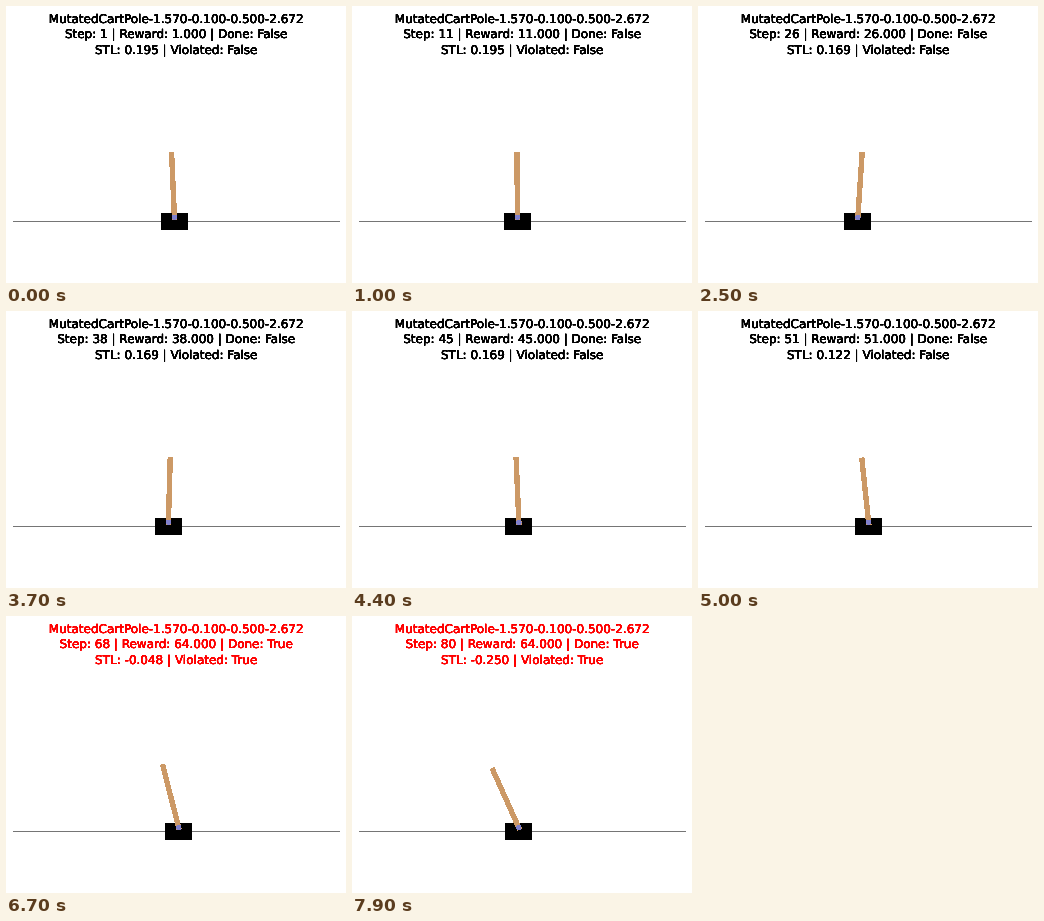
Recreate the animation shown at these times as an HTML page. Size 340 by 277 pixels, loop 8 s.

```html
<!DOCTYPE html>
<html lang="en">
<head>
<meta charset="utf-8">
<title>Cart pole</title>
<style>
  html, body { margin: 0; width: 100%; height: 100%; overflow: hidden; background: #fff; }
  svg { display: block; }
  text {
    font: 12px "DejaVu Sans", sans-serif;
    text-anchor: middle;
    text-rendering: geometricPrecision;
    white-space: pre;
  }
  #cart { shape-rendering: crispEdges; }
</style>
</head>
<body>
<svg width="340" height="277" viewBox="0 0 340 277">
  <g id="caption"></g>
  <rect x="7" y="215" width="327" height="1" fill="#757575"/>
  <g id="cart">
    <rect x="-13.6" y="207" width="27.2" height="17"/>
    <g transform="translate(0 211.4)">
      <rect id="pole" x="-2.7" y="-65.2" width="5.4" height="67.9" fill="#cc9966"/>
      <circle r="2.7" fill="#8080cc"/>
    </g>
  </g>
</svg>
<script>
const STEP_MS = 100, STEPS = 80, COPIES = 8;
const MARGIN = 0.247;          // lean at which the constraint is violated
const LEAN_TO_DEG = 0.849 * 180 / Math.PI;

// The cart is pushed left, then right from FIRST_TURN, then left again from LAST_TURN.
const FIRST_TURN = 11.98, LAST_TURN = 43.17, CART_LAG = 0.4;
const PIVOT = 50;              // step at which position and speed are given
const PUSH = 0.0435;           // cart acceleration, px per step squared
const RATE = 0.0745;           // growth rate of the falling pole per step
const BALANCE = 0.1987;        // lean at which gravity cancels the push

const before = (turn, step) => Math.max(0, turn - step);

// Linearised inverted pendulum under the three pushes
function leanAt(step) {
  const t = RATE * (step - PIVOT);
  const swing = turn => 2 * BALANCE * (Math.cosh(RATE * before(turn, step)) - 1);
  return 0.0737 * Math.cosh(t) - 0.1454 * Math.sinh(t) - BALANCE
    - swing(LAST_TURN) + swing(FIRST_TURN);
}

// Constant acceleration under each push, plus a small recoil from the pole
function cartAt(step) {
  const t = step - PIVOT;
  const shift = turn => PUSH * before(turn + CART_LAG, step) ** 2;
  return 170.4 + 0.472 * t - PUSH / 2 * t * t
    + shift(LAST_TURN) - shift(FIRST_TURN) - 1.73 * leanAt(step);
}

let worst = 0, reward = 0, failed = false;
const states = Array.from({ length: STEPS }, (_, step) => {
  const lean = leanAt(step);
  worst = Math.max(worst, Math.abs(lean));
  if (!failed) reward++;
  failed = worst > MARGIN;
  return { x: cartAt(step), lean, stl: MARGIN - worst, reward, failed };
});

const caption = document.getElementById("caption");
const cart = document.getElementById("cart");
const pole = document.getElementById("pole");

// Overprinting each line hardens the glyph edges.
function addLine(x, y) {
  return Array.from({ length: COPIES }, () => {
    const el = document.createElementNS("http://www.w3.org/2000/svg", "text");
    el.setAttribute("x", x);
    el.setAttribute("y", y);
    return caption.appendChild(el);
  });
}
const [title, progress, verdict] = [17, 32, 48].map(y => addLine(170.2, y));
const write = (line, text) => line.forEach(el => { el.textContent = text; });
const flag = value => value ? "True" : "False";

write(title, "MutatedCartPole-1.570-0.100-0.500-2.672");

function draw(step) {
  const { x, lean, stl, reward, failed } = states[step];
  write(progress, `Step: ${step + 1} | Reward: ${reward.toFixed(3)} | Done: ${flag(failed)}`);
  write(verdict, `STL: ${stl.toFixed(3)} | Violated: ${flag(failed)}`);
  caption.setAttribute("fill", failed ? "#f00" : "#000");
  cart.setAttribute("transform", `translate(${x.toFixed(2)} 0)`);
  pole.setAttribute("transform", `rotate(${(lean * LEAN_TO_DEG).toFixed(2)})`);
}

let start = null, shown = 0;
draw(0);
function tick(now) {
  if (start === null) start = now;
  const step = Math.floor((now - start) / STEP_MS) % STEPS;
  if (step !== shown) draw(shown = step);
  requestAnimationFrame(tick);
}
requestAnimationFrame(tick);
</script>
</body>
</html>
```
